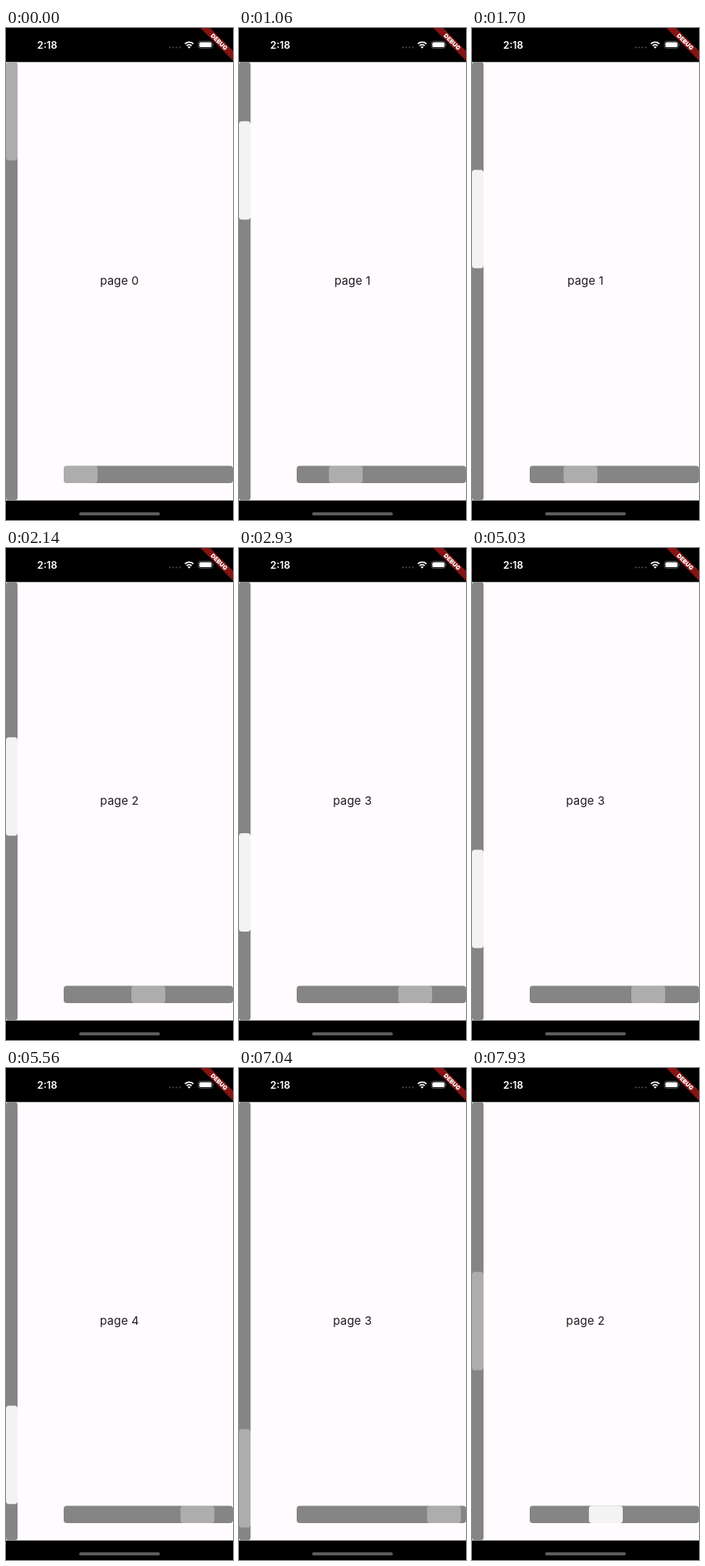
These frames come from a looping animation (295x640 px, 8000 ms). An HTML page:

```html
<!DOCTYPE html>
<html lang="en">
<head>
<meta charset="utf-8">
<title>Page scrollbars</title>
<style>
  html, body { margin: 0; width: 100%; height: 100%; overflow: hidden; background: #000; }
  svg { display: block; width: 100%; height: 100%; }
  text { font-family: Inter, Roboto, sans-serif; text-anchor: middle; }
</style>
</head>
<body>
<svg viewBox="0 0 295 640">
  <rect width="295" height="640"/>
  <rect y="44.3" width="295" height="570.3" fill="#fffbfe"/>

  <!-- status bar -->
  <g fill="#fff">
    <text x="53.6" y="27" font-size="13" font-weight="600">2:18</text>
    <path d="M213 25.3h14" stroke="#484848" stroke-width="2.2" stroke-linecap="round" stroke-dasharray="0 4.3"/>
    <g fill="none" stroke="#fff" stroke-width="1.9">
      <path d="M232.5 20.6a8 8 0 0 1 11 0"/>
      <path d="M234.7 23.1a4.9 4.9 0 0 1 6.6 0"/>
    </g>
    <path d="M238 26.7l-1.9-2a2.7 2.7 0 0 1 3.8 0z"/>
    <rect x="250" y="17.2" width="18.4" height="9.2" rx="2.8" fill="none" stroke="#666" stroke-width=".8"/>
    <rect x="251.3" y="18.5" width="15.8" height="6.6" rx="1.7"/>
    <path d="M269.4 20.3q1.4 1.5 0 3z" fill="#666"/>
  </g>

  <!-- corner banner -->
  <g transform="translate(295 0) rotate(45)">
    <rect x="-30" y="21" width="60" height="9" fill="#851414"/>
    <text y="28.2" font-size="7.7" font-weight="900" fill="#fff">DEBUG</text>
  </g>

  <text id="label" x="147.5" y="334.2" font-size="15" letter-spacing=".2" fill="#1c1b1f"></text>

  <g fill="#858585">
    <rect y="44.3" width="15" height="570.3" rx="4"/>
    <rect x="75" y="569.5" width="220" height="22.5" rx="4"/>
  </g>
  <g fill="#fff">
    <rect id="vThumb" width="15" height="128" rx="4"/>
    <rect id="hThumb" y="569.5" width="44" height="22.5" rx="4"/>
  </g>
  <rect x="95" y="630" width="105" height="4" rx="2" fill="#5c5c5c"/>
</svg>

<script>
const LOOP = 8000, STEP = 10;
const GLIDE = 200; // time a released or following thumb takes to reach its page

// Finger position in pages over time; a gesture without a bar is a tap that moves both thumbs.
const gestures = [
  { bar: "v", path: [[850, 0.5], [2140, 1.84], [2380, 2.5], [3450, 3.44], [3720, 3.44]] },
  { bar: "v", path: [[4830, 3], [5680, 3.68]] },
  { path: [[7010, 3], [7020, 3]] },
  { bar: "h", path: [[7210, 3], [7930, 1.73], [LOOP, 1.73]] }
];

// The screen refreshes in bursts: first, last, interval
const bursts = [[0, 0, 1], [940, 3450, 109], [3800, 3950, 150],
                [4920, 5670, 106], [5860, 5860, 1], [7040, 7930, 111]];

function lastRefresh(time) {
  const [first, last, interval] = bursts.findLast(([start]) => start <= time);
  return Math.min(last, time - (time - first) % interval);
}

function along(path, t) {
  const i = path.findIndex(([time]) => time >= t);
  if (i === 0) return path[0][1];
  const [t0, a] = path[i - 1], [t1, b] = path[i];
  return a + (b - a) * (t - t0) / (t1 - t0);
}

function glideTo(thumb, page, t) {
  Object.assign(thumb, { from: thumb.pos, to: page, start: t });
}

// Replays the gestures up to a time: the held thumb follows the finger, the rest glide to its page.
function simulate(end) {
  const newThumb = () => ({ pos: 0, from: 0, to: 0, start: 0, held: false });
  const thumbs = { v: newThumb(), h: newThumb() };
  let page = 0;
  for (let t = 0; t <= end; t += STEP) {
    const gesture = gestures.find(({ path }) => path[0][0] <= t && t <= path.at(-1)[0]);
    const finger = gesture && along(gesture.path, t);
    if (gesture) page = Math.round(finger);
    for (const [bar, thumb] of Object.entries(thumbs)) {
      const wasHeld = thumb.held;
      thumb.held = gesture?.bar === bar;
      if (thumb.held) {
        thumb.pos = thumb.to = finger;
      } else {
        if (wasHeld || thumb.to !== page) glideTo(thumb, page, t);
        const progress = Math.min(1, (t - thumb.start) / GLIDE);
        thumb.pos = thumb.from + (thumb.to - thumb.from) * progress;
      }
    }
  }
  return { page, ...thumbs };
}

const [label, vThumb, hThumb] = ["label", "vThumb", "hThumb"].map(id => document.getElementById(id));

function place(element, axis, value, held) {
  element.setAttribute(axis, value);
  element.setAttribute("opacity", held ? 0.9 : 0.33);
}

function draw(now) {
  const { page, v, h } = simulate(lastRefresh(now % LOOP));
  label.textContent = "page " + page;
  place(vThumb, "y", 44.2 + 110.5 * v.pos, v.held);
  place(hThumb, "x", 75 + 44 * h.pos, h.held);
}

let begin;
function tick(now) {
  begin ??= now;
  draw(now - begin);
  requestAnimationFrame(tick);
}
draw(0);
requestAnimationFrame(tick);
</script>
</body>
</html>
```
